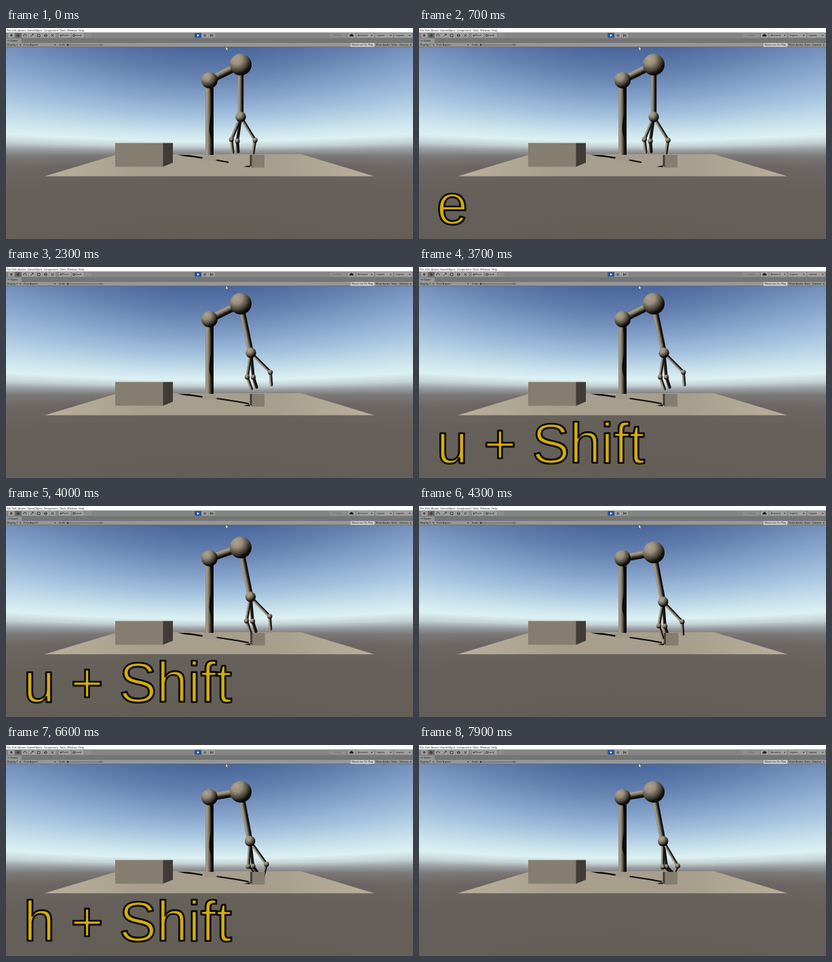
These frames come from a looping animation (600x311 px, 8000 ms). An HTML page with a canvas:

```html
<!DOCTYPE html>
<html lang="en">
<head>
<meta charset="utf-8">
<title>Robot arm</title>
<style>
html, body { margin: 0; width: 100%; height: 100%; overflow: hidden; background: #635d56; }
canvas, svg { position: absolute; left: 0; top: 0; display: block; width: 100vw; height: 100vh; }
text { font-family: "Open Sans", "Liberation Sans", sans-serif; font-size: 3.85px; fill: #111; white-space: pre; }
#key { font: 83px "Liberation Sans", Arial, sans-serif; fill: #d3ad0b; stroke: #0b0a06; stroke-width: 2.7; stroke-linejoin: round; }
</style>
</head>
<body>
<canvas id="sky" width="600" height="311"></canvas>
<svg viewBox="0 0 600 311" preserveAspectRatio="none">
  <defs>
    <linearGradient id="floor">
      <stop offset="0" stop-color="#b9b09b"/>
      <stop offset=".3" stop-color="#a79e8d"/>
      <stop offset=".7" stop-color="#a79e8d"/>
      <stop offset="1" stop-color="#b9b09b"/>
    </linearGradient>
    <linearGradient id="tube" x1="0" y1="0" x2="0" y2="1">
      <stop offset="0" stop-color="#080706"/>
      <stop offset=".28" stop-color="#1b1814"/>
      <stop offset=".6" stop-color="#847b6b"/>
      <stop offset=".85" stop-color="#aaa08c"/>
      <stop offset="1" stop-color="#8e8574"/>
    </linearGradient>
    <linearGradient id="dark" x1="0" y1="0" x2="0" y2="1">
      <stop offset="0" stop-color="#080706"/>
      <stop offset=".6" stop-color="#1c1915"/>
      <stop offset="1" stop-color="#5a5449"/>
    </linearGradient>
    <radialGradient id="ball" cx=".3" cy=".24" r=".78">
      <stop offset="0" stop-color="#aca28e"/>
      <stop offset=".35" stop-color="#968d7b"/>
      <stop offset=".68" stop-color="#4c463b"/>
      <stop offset=".88" stop-color="#15120e"/>
      <stop offset="1" stop-color="#080706"/>
    </radialGradient>
  </defs>

  <path d="M57 218.5 165 186H435L543 218.5Z" fill="url(#floor)"/>
  <path d="M161 169.5H232V204.5H161Z" fill="#857d70"/>
  <path d="M231.5 169.5H246V198.5L231.5 204.5Z" fill="#403b34"/>
  <path d="M253 186.8 270 187.2 291 190.5V193L276 190.5 264 189.2Z" fill="#0d0c0a"/>
  <path id="shade" fill="none" stroke="#0d0c0a" stroke-width="2" stroke-linejoin="round"/>
  <path d="M289 194.5A11 11 0 0 1 311 194.5Q300 196.5 289 194.5Z" fill="#a1988a"/>
  <g id="arm"></g>
  <g id="cube">
    <path d="M350 204.3 359.5 202.5V205.3Z" fill="#0d0c0a"/>
    <path d="M359.5 187H364V205.7L359.5 203.5Z" fill="#443f36"/>
    <path d="M362.5 187H381V205.7H362.5Z" fill="#857d70"/>
  </g>

  <g id="bars">
    <rect width="600" height="7" fill="#fdfdfd"/>
    <rect y="6.5" width="600" height="9" fill="#858585"/>
    <rect y="15" width="600" height="7.5" fill="#757575"/>
    <rect y="15.5" width="23" height="7" fill="#949494"/>
    <rect y="22" width="600" height="6" fill="#979797"/>
    <rect y="27.6" width="600" height=".6" fill="#5d5d5d"/>
    <rect x="508" y="22.3" width="35" height="5.4" fill="#d2d2d2"/>
    <path d="M90 25H139" stroke="#555" stroke-width=".8"/>
    <circle cx="91" cy="25" r="1.4" fill="#333"/>
  </g>
  <path d="M324 27.5V33L325.3 31.8 326.3 34 327.2 33.6 326.2 31.5H328Z" fill="#fff" stroke="#222" stroke-width=".4"/>
  <text id="key" x="26" y="289"></text>
</svg>
<script>
const $ = id => document.getElementById(id);
const add = (parent, name, attrs, label) => {
  const el = document.createElementNS("http://www.w3.org/2000/svg", name);
  for (const k in attrs) el.setAttribute(k, attrs[k]);
  if (label) el.textContent = label;
  return parent.appendChild(el);
};

// Sky: each column is stretched from the horizon, as a wide lens does
const horizon = 186, focal = 245;
const skyStops = { 28: "#48659a", 70: "#6481b0", 100: "#819fc8", 130: "#a4c2dd", 155: "#cbe3ed", 167: "#dcf1f2",
  175: "#c4d1d5", 181: "#9a9fa2", 188: "#7a7877", 200: "#6b6663", 225: "#656059", 311: "#625d55" };
const ctx = $("sky").getContext("2d");
for (let x = 0; x < 600; x++) {
  const s = Math.hypot(1, (x - 300) / focal);
  const top = horizon - (horizon - 28) * s, size = 283 * s;
  const grad = ctx.createLinearGradient(0, top, 0, top + size);
  for (const y in skyStops) grad.addColorStop((y - 28) / 283, skyStops[y]);
  ctx.fillStyle = grad;
  ctx.fillRect(x, 0, 1, 311);
}

// Editor bars
const bars = $("bars");
const label = (x, y, str, fill = "#111") => add(bars, "text", { x, y, style: `fill:${fill}` }, str);
const button = (x, w, str, fill = "#a0a0a0") => {
  add(bars, "rect", { x, y: 7.6, width: w, height: 6.6, rx: .8, fill });
  if (str) label(x + 2, 12.4, str);
};
const icon = d => add(bars, "path", { d, fill: "none", stroke: "#222", "stroke-width": .8 });
const arrow = (x, y) => add(bars, "path", { d: `M${x} ${y}h2.4l-1.2 1.6z`, fill: "#222" });

label(1, 4.8, "File  Edit  Assets  GameObject  Component  Tools  Window  Help");
for (let i = 0; i < 7; i++) button(3 + i * 10.1, 9.6, "", i === 1 ? "#686868" : "#a0a0a0");
["M-1 1.5v-3M0 1.5V-2M1 1.5v-3", "M-2.5 0h5M0-2.5v5", "M-1.5 1.5a2 2 0 1 1 3 0", "M-2 2 2-2M0-2h2v2",
  "M-2-1.7h4v3.4h-4z", "M-2 0h4M0-2a2 2 0 1 0 .1 0", "M-2-2 2 2M-2 2 2-2"].forEach((d, i) =>
  icon(d).setAttribute("transform", `translate(${7.8 + i * 10.1} 11)`));
button(78, 17.5, "   Pivot");
button(97, 18, "   Local");
button(117, 9, "", "#8d8d8d");
icon("M79.5 11h3M81 9.5v3M98.5 11a1.5 1.5 0 1 0 3 0a1.5 1.5 0 1 0-3 0");
button(278, 10, "", "#28568f");
button(288.5, 9.5);
button(298.5, 9.5);
add(bars, "path", { d: "M281.8 9v4l3.2-2z", fill: "#e4efff" });
icon("M292.3 9.2v3.6M294.2 9.2v3.6M301.5 9.2v3.6l2.5-1.8zM305 9.2v3.6");
button(477, 25, "", "#8e8e8e");
label(483, 12.4, "Collect", "#666");
button(504, 11);
add(bars, "path", { d: "M507 12.5a1.4 1.4 0 0 1 .5-2.6a2 2 0 0 1 3.6 0a1.4 1.4 0 0 1 .6 2.6z", fill: "#222" });
["Account", "Layers", "Layout"].forEach((s, i) => {
  button(516.5 + i * 28, 26, s);
  arrow(538 + i * 28, 10.3);
});
label(2, 20.4, "⊶ Game");
label(1.5, 26.4, "Display 1");
label(26, 26.4, "Free Aspect");
label(78, 26.4, "Scale");
label(138.5, 26.4, "2x");
label(509.5, 26.4, "Maximize On Play");
label(545, 26.4, "Mute Audio");
label(568, 26.4, "Stats");
label(580, 26.4, "Gizmos");
[20, 71, 595.5].forEach(x => arrow(x, 24.3));

// Arm parts, back to front
const arm = $("arm");
const tube = (w, fill = "tube") => {
  const el = add(arm, "rect", { y: -w / 2, height: w, rx: w < 6 ? 2 : 0, fill: `url(#${fill})` });
  return (a, b) => {
    const dx = b[0] - a[0], dy = b[1] - a[1];
    el.setAttribute("width", Math.hypot(dx, dy));
    el.setAttribute("transform", `translate(${a}) rotate(${Math.atan2(dy, dx) * 180 / Math.PI})`);
  };
};
const ball = r => {
  const el = add(arm, "circle", { r, fill: "url(#ball)" });
  return p => el.setAttribute("transform", `translate(${p})`);
};
// Point at a distance from p, the angle counted from straight down
const reach = (p, len, angle) => [p[0] + len * Math.sin(angle), p[1] + len * Math.cos(angle)];

const finger = (spread, len, bend, tipLen, fill) => {
  const upper = tube(4.6, fill), lower = tube(4.6, fill), knee = ball(3.7);
  return (wrist, turn, grip) => {
    const joint = reach(wrist, len + 2 * grip, turn + spread * (1 - .42 * grip));
    const tip = reach(joint, tipLen, turn + bend + Math.sign(bend) * .5 * grip);
    upper(wrist, joint);
    lower(joint, tip);
    knee(joint);
  };
};

const shoulder = [300, 77];
tube(12)([300, 80], [300, 187]);
add(arm, "path", { d: "M301 88H306V172Q303 164 300 155Q298.5 145 302 128Q303 110 301 88Z", fill: "#0b0a08" });
const upperArm = tube(11);
ball(12)(shoulder);
const fingers = [finger(-.14, 36, .08, 18, "dark"), finger(-.39, 36, .1, 21), finger(.55, 40.5, -.16, 21)];
const forearm = tube(8.4), wristBall = ball(7.7), elbowBall = ball(16);

// Each key press drives one joint at constant speed
const keys = [
  { name: "e", at: 700 },
  { name: "u + Shift", at: 3700 },
  { name: "h + Shift", at: 6200 }
];
const driveTime = 620, shownTime = 600;

function draw(t) {
  const [swing, lift, grip] = keys.map(k => Math.min(1, Math.max(0, (t - k.at) / driveTime)));
  const angle = .205 * swing - .018 * lift;
  const elbow = [346, 54 + 15 * lift];
  const wrist = reach(elbow, 77 - 3 * swing, angle);
  upperArm(elbow, shoulder);
  forearm(elbow, wrist);
  fingers.forEach(f => f(wrist, angle * 1.15, grip));
  wristBall(wrist);
  elbowBall(elbow);

  const x = 328 + 30 * swing, y = 198 + 3.5 * swing;
  $("shade").setAttribute("d", `M306 193L${x - 16} ${y - 3}L${x} ${y}`);
  $("cube").setAttribute("transform", `translate(${1.5 * lift * (1 - grip)})`);
  const key = keys.find(k => t >= k.at && t < k.at + shownTime);
  $("key").textContent = key ? key.name : "";
}

const start = performance.now();
function tick() {
  const t = (performance.now() - start) % 8000;
  draw(Math.floor(t / 100) * 100);
  requestAnimationFrame(tick);
}
tick();
</script>
</body>
</html>
```
